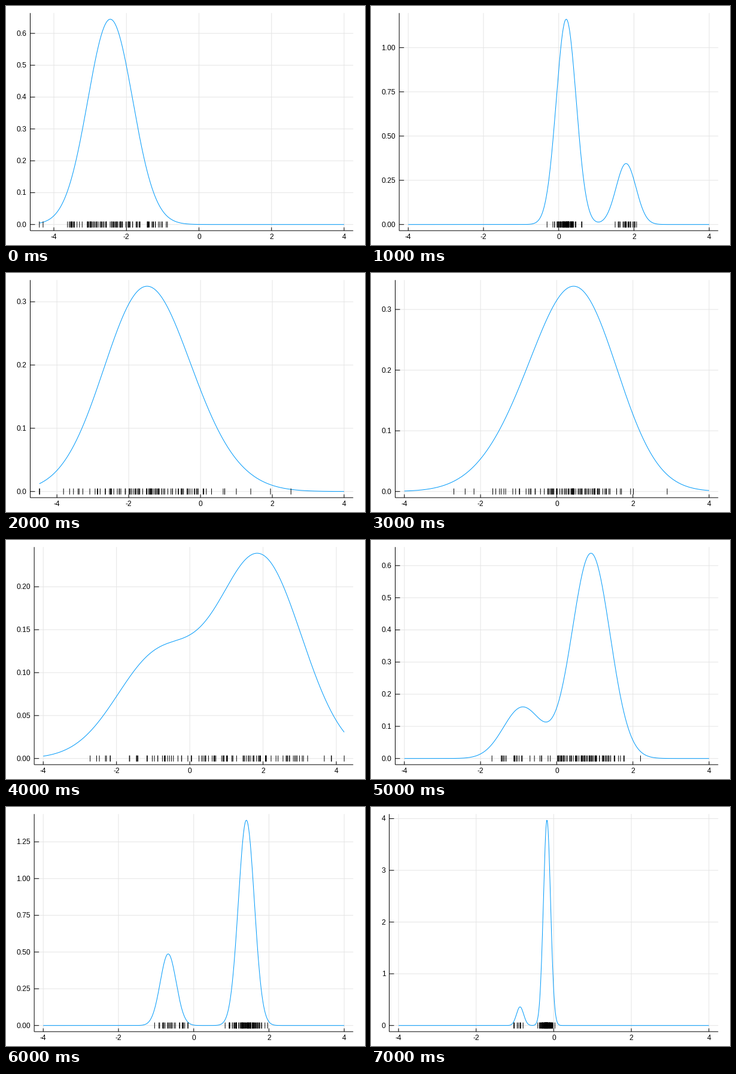
A matplotlib script that plays this animation: 600 px wide and 400 px high, repeating every 8000 ms.

```python
import numpy as np
import matplotlib.pyplot as plt
from matplotlib.animation import FuncAnimation

plt.rcParams["path.snap"] = False

PX = 0.72  # points per pixel at 100 dpi
TOP, BOTTOM, RIGHT = 11.8, 376, 580.3
PAD = 0.03 / 1.06
FONT = 12
BLUE, GRID = "#009AFA", "#E5E5E5"

# y tick step, label decimals, shared sd, then per bell:
# weight, mean, smallest and largest sample
SCENES = [
    (0.1, 1, 0.619, [(1, -2.445, -4.4, -0.87)]),
    (0.25, 2, 0.265, [(0.771, 0.2, -0.31, 0.62), (0.229, 1.79, 1.5, 2.07)]),
    (0.1, 1, 1.143, [(0.86, -1.6, -4.49, 1.4), (0.14, -0.2, -1.5, 2.52)]),
    (0.1, 1, 1.05, [(0.8, 0.6, -1.6, 2.9), (0.2, -0.8, -2.7, 1)]),
    (0.05, 2, 1.14, [(0.335, -0.87, -2.72, 1), (0.665, 1.92, -0.5, 4.215)]),
    (0.1, 1, 0.5, [(0.8, 0.9, -0.4, 2.2), (0.2, -0.9, -1.7, 0.1)]),
    (0.25, 2, 0.2117, [(0.2585, -0.678, -1.04, -0.15),
                       (0.7415, 1.4, 0.835, 1.965)]),
    (1, 0, 0.0921, [(0.083, -0.868, -1.03, -0.79),
                    (0.917, -0.174, -0.41, 0.03)]),
]

fig = plt.figure(figsize=(6, 4), dpi=100, facecolor="white")
ax = fig.add_axes([0, 0, 1, 1])


def density(x, bells, sd):
    total = sum(w * np.exp(-((x - m) / sd) ** 2 / 2) for w, m, _, _ in bells)
    return total / (sd * np.sqrt(2 * np.pi))


def samples(bells, seed):
    """Normal draws, scaled on each side of the mean to reach the extremes."""
    rng = np.random.default_rng(seed)
    parts = []
    for w, mean, lo, hi in bells:
        z = rng.normal(size=round(100 * w))
        parts.append(np.interp(z, [z.min(), 0, z.max()], [lo, mean, hi]))
    return np.concatenate(parts)


def line(x, y, color="black", z=2):
    ax.plot(x, y, color=color, lw=PX, zorder=z, solid_capstyle="butt")


def label(x, y, text, align):
    ax.text(x, y, text, ha=align, va="baseline", fontsize=FONT * PX,
            family="Liberation Sans", color="black")


def draw(i):
    ax.clear()
    ax.set(xlim=(0, 600), ylim=(400, 0))
    ax.axis("off")
    step, decimals, sd, bells = SCENES[i]

    # the axis makes room for the widest label
    ems = 0.556 * (1 + decimals) + 0.278 * (decimals > 0)
    left = 23.8 + FONT * ems
    width, height = RIGHT - left, BOTTOM - TOP

    rug = samples(bells, i)
    x0, x1 = min(-4, rug.min()), max(4, rug.max())
    xs = np.linspace(x0, x1, 700)
    ys = density(xs, bells, sd)

    def px(x):
        return left + width * (PAD + (x - x0) / (x1 - x0) / 1.06)

    def py(y):
        return BOTTOM - height * (PAD + y / ys.max() / 1.06)

    for t in range(-4, 5, 2):
        x = px(t)
        line([x, x], [TOP, BOTTOM], GRID, 1)
        line([x, x], [BOTTOM, BOTTOM - 5.5])
        label(x, 390, str(t), "center")

    for t in np.arange(0, ys.max() * 1.03, step):
        y = py(t)
        line([left, RIGHT], [y, y], GRID, 1)
        line([left, left + 8], [y, y])
        label(left - 6, y + 4, f"{t:.{decimals}f}", "right")

    line([left, left], [TOP, BOTTOM])
    line([left, RIGHT], [BOTTOM, BOTTOM])
    line(px(xs), py(ys), BLUE, 3)
    zero = py(0)
    ax.vlines(px(rug), zero - 5, zero + 5, color="black", lw=PX, zorder=4)
    return []


anim = FuncAnimation(fig, draw, frames=len(SCENES), interval=1000,
                     init_func=lambda: [], repeat=True, repeat_delay=0,
                     blit=False)
plt.show()
```
